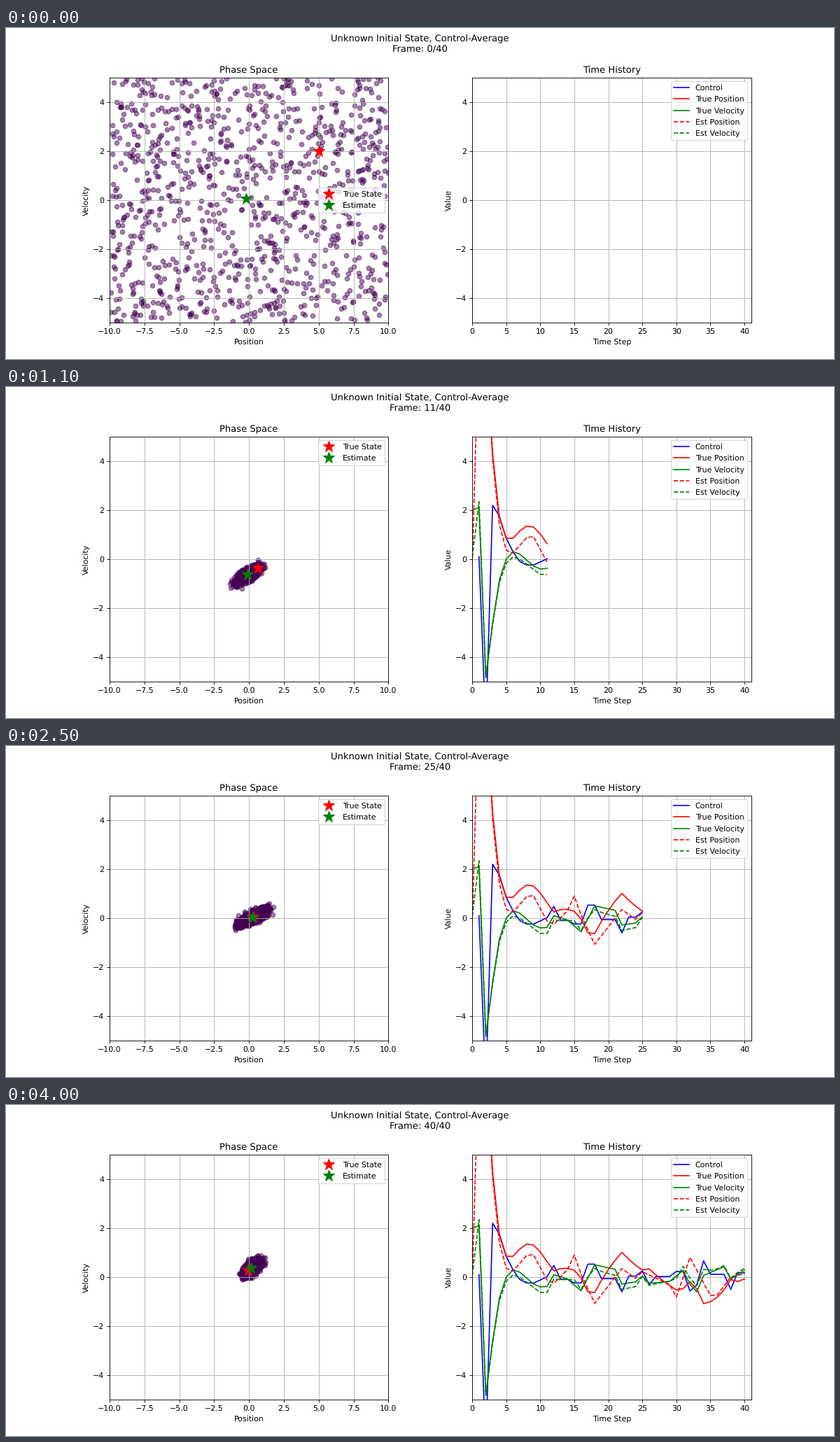
A matplotlib script that plays this animation: 1183 px wide and 473 px high, repeating every 4.1 s.

```python
import numpy as np
import matplotlib.pyplot as plt
from matplotlib.animation import FuncAnimation

W, H, DPI = 1183, 473, 78.85
STEPS = 40
COUNT = 1000
steps = np.arange(STEPS + 1)

plt.rcParams["text.hinting"] = "none"

# Turning points (step, value), joined by straight lines
VELOCITY = [(0, 2), (1, 2.1), (2, -4.8), (3, -2.6), (4, -.85), (5, 0),
            (6, .3), (7, .2), (9, -.28), (10, -.4), (11, -.38), (12, .1),
            (14, -.08), (16, -.56), (18, .5), (21, .32), (22, -.28),
            (24, -.2), (25, .05), (26, -.25), (29, -.18), (31, .28),
            (32, -.29), (33, -.6), (34, .07), (37, .42), (38, -.08),
            (40, .28)]
ESTIMATE = [(1, 9.3), (2, 9.0), (3, 4.05), (4, 1.4), (5, .36), (6, .25),
            (8, .88), (9, .92), (11, -.12), (12, -.25), (14, .3), (15, .9),
            (16, .12), (18, -1.07), (22, .35), (24, -.05), (25, .22),
            (29, -.3), (30, -.81), (32, .8), (35, -.75), (36, -.73),
            (38, 0), (40, .15)]


def path(keys):
    return np.interp(steps, *zip(*keys))


def prior():
    rng = np.random.RandomState(42)
    return np.column_stack([rng.uniform(-10, 10, COUNT),
                            rng.uniform(-5, 5, COUNT)])


# Double integrator: control changes velocity, velocity moves position
true_vel = path(VELOCITY)
true_pos = 5 + np.append(0, np.cumsum(true_vel[:-1]))
control = np.append(0, np.diff(true_vel))

# The velocity estimate leans the same way as the position error
est_pos = path(ESTIMATE)
est_vel = true_vel + .35 * np.clip(est_pos - true_pos, -.7, .7)
est_pos[0], est_vel[0] = prior().mean(axis=0)


def particles(step):
    """Uniform prior at the start, then a tilted cloud near the estimate."""
    if step == 0:
        return prior()
    rng = np.random.RandomState(100 + step)
    half_x = np.interp(step, [1, 7, 20, 32, 40], [2.2, 1.08, 1.95, 1.1, 1.05])
    half_y = .45 + .1 * half_x
    along, side_x, side_y = np.clip(rng.normal(0, .45, (3, COUNT)), -1, 1)
    x = est_pos[step] + (half_x - .45) * along + .45 * side_x
    y = est_vel[step] + (half_y - .25) * along + .25 * side_y
    return np.column_stack([x, y])


# The small excess keeps the pixel size from being truncated
fig, (phase, history) = plt.subplots(
    1, 2, figsize=((W + .001) / DPI, (H + .001) / DPI), dpi=DPI)
fig.subplots_adjust(left=.125, right=.9, bottom=.11, top=.85, wspace=.3)
heading = fig.suptitle("")


def setup(ax, title, xlabel, ylabel, xlim):
    ax.set_title(title)
    ax.set_xlabel(xlabel)
    ax.set_ylabel(ylabel)
    ax.set_xlim(*xlim)
    ax.set_ylim(-5, 5)
    ax.grid(True)


setup(phase, "Phase Space", "Position", "Velocity", (-10, 10))
setup(history, "Time History", "Time Step", "Value", (0, STEPS + 1))

dots = phase.scatter(*particles(0).T, color="#440154", alpha=.5)
true_star, = phase.plot([], [], "r*", markersize=15, label="True State")
est_star, = phase.plot([], [], "g*", markersize=15, label="Estimate")
phase_key = phase.legend(loc="upper right")

# Data, line style, label, first step shown
SERIES = [
    (control, "b-", "Control", 1),
    (true_pos, "r-", "True Position", 0),
    (true_vel, "g-", "True Velocity", 0),
    (est_pos, "r--", "Est Position", 0),
    (est_vel, "g--", "Est Velocity", 0)]
curves = [history.plot([], [], style, label=name)[0]
          for _, style, name, _ in SERIES]
history.legend(loc="upper right")


def draw(step):
    heading.set_text("Unknown Initial State, Control-Average\n"
                     f"Frame: {step}/{STEPS}")
    dots.set_offsets(particles(step))
    true_star.set_data([true_pos[step]], [true_vel[step]])
    est_star.set_data([est_pos[step]], [est_vel[step]])
    phase_key.set_loc("upper right" if step else "center right")
    for curve, (data, _, _, first) in zip(curves, SERIES):
        shown = slice(first, step + 1)
        curve.set_data(steps[shown], data[shown])
    return [heading, dots, true_star, est_star, phase_key, *curves]


def reset():
    return draw(0)


anim = FuncAnimation(fig, draw, frames=STEPS + 1, init_func=reset,
                     interval=100, repeat=True, repeat_delay=0, blit=False)
plt.show()
```
